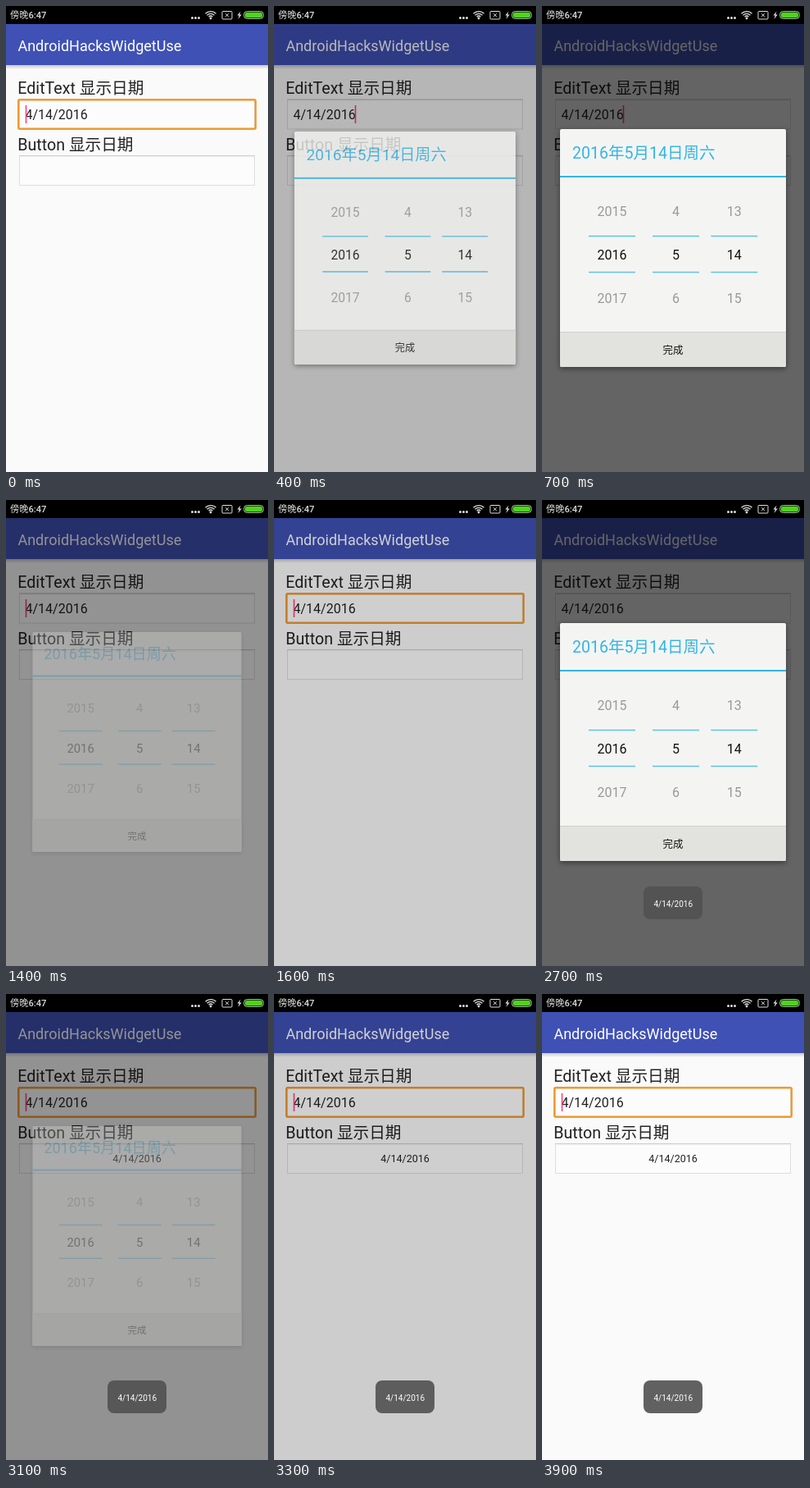
Write an HTML page that moves like this. It is 320 px wide and 568 px high and loops after 4 s.

```html
<!DOCTYPE html>
<html lang="zh-CN">
<head>
<meta charset="utf-8">
<style>
html, body { margin: 0; height: 100%; overflow: hidden; background: #fafafb; }
svg { display: block; width: 320px; height: 568px; font-family: Roboto, "Noto Sans CJK SC", sans-serif; }
.mid { text-anchor: middle; }
#dialog { filter: drop-shadow(0 2px 3px rgba(0,0,0,.45)); }
</style>
</head>
<body>
<svg viewBox="0 0 320 568">
  <defs>
    <linearGradient id="shade" x2="0" y2="1">
      <stop stop-color="#000" stop-opacity=".2"/><stop offset="1" stop-color="#000" stop-opacity="0"/>
    </linearGradient>
    <g id="field">
      <rect x="16" width="288" height="37" fill="#fcfcfc"/>
      <rect x="16" width="288" height="3" fill="url(#shade)" opacity=".4"/>
      <rect x="16.5" y=".5" width="287" height="36" fill="none" stroke="#dedede"/>
      <path d="M16 .5H304" stroke="#cdcdcd"/>
    </g>
  </defs>

  <rect width="320" height="568" fill="#fafafb"/>
  <rect y="72" width="320" height="5" fill="url(#shade)"/>
  <rect y="21" width="320" height="51" fill="#3f51b5"/>
  <text x="14.4" y="54.5" font-size="18.05" fill="#fff">AndroidHacksWidgetUse</text>

  <g font-size="19.65" fill="#222">
    <text x="14.3" y="107">EditText 显示日期</text>
    <text x="14.3" y="176">Button 显示日期</text>
  </g>
  <use href="#field" y="113.5"/>
  <use href="#field" y="182"/>
  <rect id="focus" x="15.2" y="114.2" width="289.6" height="35.6" rx="1.5" fill="none" stroke="#f09a30" stroke-width="2.4"/>
  <text x="23.5" y="138" font-size="16" fill="#222">4/14/2016</text>
  <rect id="cursor" y="121" width="1.6" height="22" fill="#ff4081"/>
  <text id="chosen" class="mid" x="160" y="205" font-size="12.5" fill="#222">4/14/2016</text>

  <rect id="dim" y="22" width="320" height="546"/>

  <g id="dialog">
    <rect x="22" y="150" width="276" height="290" rx="2" fill="#f4f5f3"/>
    <text x="37" y="185.5" font-size="19.56" fill="#33b5e5">2016年5月14日周六</text>
    <rect x="22" y="207" width="276" height="2" fill="#33b5e5"/>
    <g id="wheels" class="mid" font-size="16"></g>
    <path d="M22 397H298V438a2 2 0 0 1-2 2H24a2 2 0 0 1-2-2Z" fill="#e2e3df"/>
    <path d="M22 397.5H298" stroke="#cfd0cc"/>
    <text class="mid" x="160" y="424" font-size="12.44" font-weight="500" fill="#111">完成</text>
  </g>

  <g id="toast">
    <rect x="124" y="471" width="72" height="40" rx="8" fill="#515151" opacity=".9"/>
    <text class="mid" x="160.3" y="495.7" font-size="10" fill="#fff">4/14/2016</text>
  </g>

  <rect width="320" height="22"/>
  <text x="5" y="15" font-size="11.2" font-weight="500" fill="#ddd">傍晚6:47</text>
  <g fill="#ddd">
    <circle cx="227.5" cy="14.5" r="1.5"/><circle cx="231.5" cy="14.5" r="1.5"/><circle cx="235.5" cy="14.5" r="1.5"/>
    <circle cx="250" cy="15" r="1.4"/>
    <path d="M286.5 6.5l-4 5h2.3l-1.3 4.5 4.2-5.5h-2.4z"/>
  </g>
  <g fill="none" stroke="#ddd" stroke-width="1.3">
    <path d="M243.5 9.3a9.2 9.2 0 0 1 13 0M245.5 11.3a6.4 6.4 0 0 1 9 0M247.6 13.2a3.4 3.4 0 0 1 4.8 0"/>
    <rect x="264" y="6.5" width="12" height="9.5" rx="1" stroke-width="1"/>
    <path d="M268 9.2l4 4M272 9.2l-4 4" stroke-width="1"/>
  </g>
  <rect x="290.5" y="6.5" width="24" height="9" rx="4" fill="#1c4a10" stroke="#9ab894"/>
  <rect x="292" y="8" width="21" height="6" rx="2.5" fill="#4fd41c"/>
</svg>
<script>
const el = id => document.getElementById(id);
const ramp = (t, start, span) => Math.min(1, Math.max(0, (t - start) / span));
const within = (t, a, b) => t >= a && t < b;
const fade = (id, v) => el(id).setAttribute("opacity", v);

el("wheels").innerHTML = [[85.5, 2016], [163.5, 5], [234.8, 14]].map(([x, n]) =>
  [-1, 0, 1].map(d =>
    `<text x="${x}" y="${309 + 53 * d}" fill="${d ? "#999" : "#111"}">${n + d}</text>`).join("") +
  `<path d="M${x - 28.5} 280.5h57m0 44h-57" fill="none" stroke="#5cc3e6" stroke-width="1.6"/>`
).join("");

// opening and closing times of the two dialogs
const dialogs = [[260, 1250], [2370, 2950]];

function draw(t) {
  const [open, close] = dialogs[t < 2000 ? 0 : 1];
  const enter = 1 - (1 - ramp(t, open, 260)) ** 2;
  const shown = enter * (1 - ramp(t, close, 200));
  const scale = 0.9 + 0.1 * shown;
  fade("dialog", shown);
  el("dialog").setAttribute("transform", `translate(160 295) scale(${scale}) translate(-160 -295)`);
  fade("dim", 0.6 * ramp(t, open, 310) * (1 - ramp(t, close, 500)));

  fade("focus", +(t < 250 || within(t, 1450, 2250) || t >= 3050));
  fade("cursor", +(t < 2000 || within(t, 3050, 3350) || t >= 3850));
  el("cursor").setAttribute("x", within(t, 100, 1300) ? 98.7 : 23.7);
  fade("chosen", +(t >= 2960));
  fade("toast", ramp(t, 1750, 300));
}

function frame() {
  draw(performance.now() % 4000);
  requestAnimationFrame(frame);
}
frame();
</script>
</body>
</html>
```
